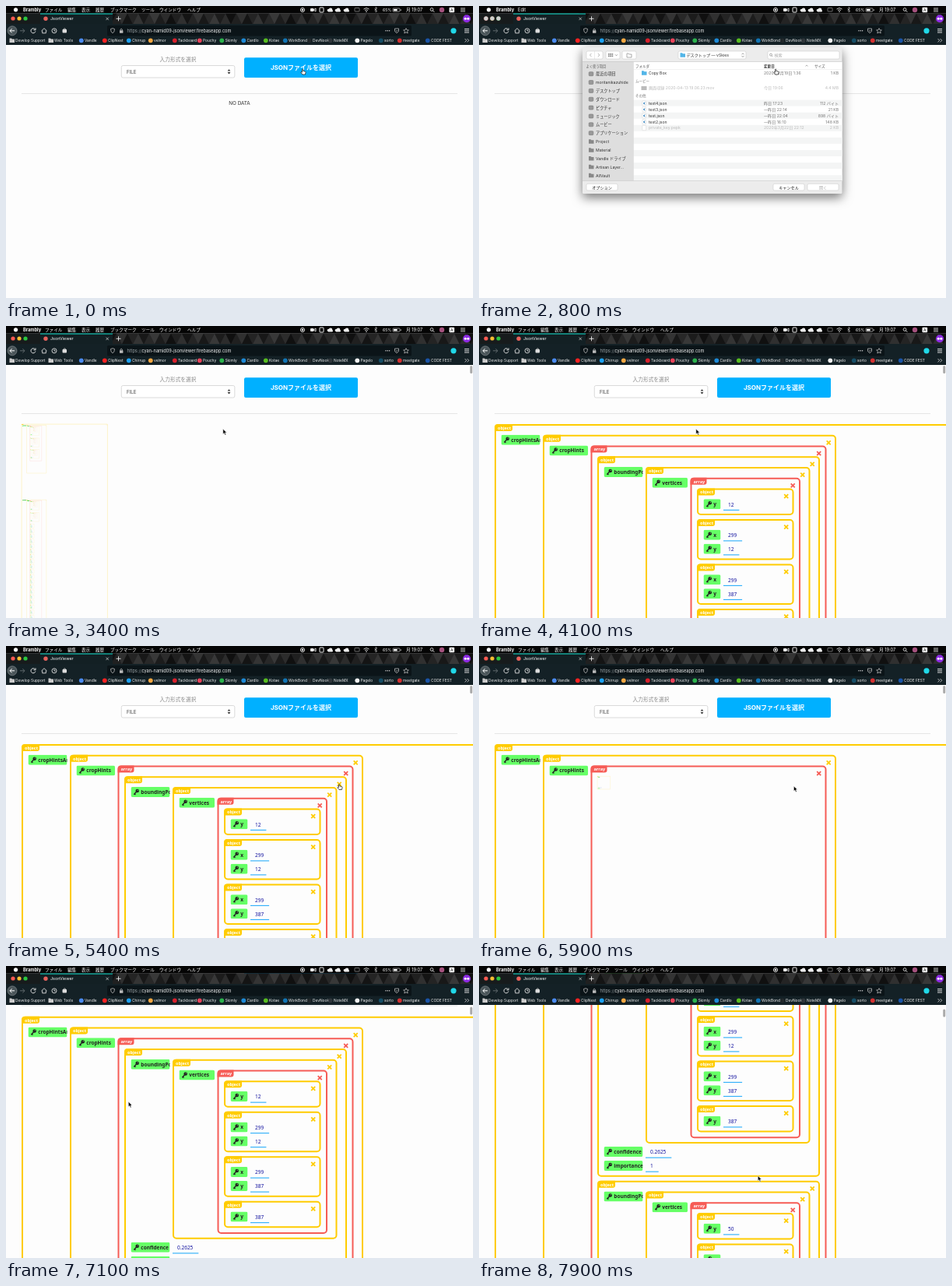
Recreate the animation shown at these times as an HTML page. Size 600 by 375 pixels, loop 8000 ms.

```html
<!DOCTYPE html>
<html>
<head>
<meta charset="utf-8">
<style>
html,body{margin:0;width:100%;height:100%;overflow:hidden;background:#fdfdfd}
svg{display:block}
text{font-family:Inter,"Noto Sans CJK JP",sans-serif;white-space:pre}
#tree text{font-family:"Noto Sans","Noto Sans CJK JP",sans-serif}
#sheet{filter:drop-shadow(0 5px 7px #0008)}
</style>
</head>
<body>
<svg id="stage" width="600" height="375" viewBox="0 0 600 375"></svg>
<script>
const YELLOW = '#fc0', RED = '#f65c56';
const text = (x, y, size, str, fill = '#fff', more = '') =>
  `<text x="${x}" y="${y}" font-size="${size}" fill="${fill}" ${more}>${str}</text>`;
const rect = (x, y, w, h, fill, r = 0, more = '') =>
  `<rect x="${x}" y="${y}" width="${w}" height="${h}" rx="${r}" fill="${fill}" ${more}/>`;
const dot = (x, y, r, fill, more = '') => `<circle cx="${x}" cy="${y}" r="${r}" fill="${fill}" ${more}/>`;
const line = (d, color = '#ddd', width = 0.9) =>
  `<path d="${d}" fill="none" stroke="${color}" stroke-width="${width}"/>`;
const MID = ' text-anchor="middle" ', END = ' text-anchor="end" ', BOLD = ' font-weight="700" ';
const folder = (x, y, fill) => `<path d="M${x} ${y}h2.5l1 1h3v4.5h-6.5z" fill="${fill}"/>`;

// ---- browser window ----
function chrome() {
  let s = rect(0, 0, 600, 9.5, '#050505') + rect(0, 9.5, 600, 14, '#1d1f20');
  for (let i = 0; i < 68; i++) {
    const x = 128 + i * 7, up = i % 2, g = 16 + (i * 37 % 11) * 4;
    s += `<path d="M${x} ${up ? 23.5 : 9.5}h14l-7 ${up ? -14 : 14}z" fill="rgb(${g},${g},${g})"/>`;
  }
  s += rect(0, 9.5, 44, 14, '#171b1c') + rect(44, 9.5, 93, 14, '#132024') + rect(44, 9.5, 93, 1.2, '#0bb8a8');
  s += rect(0, 23, 600, 27, '#142126') + rect(130, 25, 391, 13.5, '#0b1418', 1.5);
  // menu bar
  s += dot(12.5, 4.8, 2.6, '#fff') + text(22, 7, 5.7, 'Brambly', '#fff', BOLD);
  const menu = [[50, 'ファイル'], [79, '編集'], [97, '表示'], [115, '履歴'], [134, 'ブックマーク'], [174, 'ツール'], [197, 'ウインドウ'], [233, 'ヘルプ']];
  s += '<g id="menu">' + menu.map(m => text(m[0], 7, 5.6, m[1])).join('') + '</g>';
  s += '<g id="edit">' + text(50, 7, 5.7, 'Edit') + '</g>';
  s += dot(381, 5, 2.6, 'none', 'stroke="#eee" stroke-width=".9"') + dot(381, 5, 1.3, '#eee');
  s += rect(391, 3, 4.5, 4, '#eee', 1) + line('M395 5l3-2v4z', '#eee') + rect(403, 2, 5, 6, 'none', 0.8, 'stroke="#eee"');
  for (const x of [416, 426, 437]) s += dot(x - 1.5, 5.6, 1.8, '#eee') + dot(x + 1, 4.7, 2.3, '#eee') + rect(x - 2, 5, 6, 2.4, '#eee', 1.2);
  s += rect(448, 2.5, 6, 4.5, 'none', 0.5, 'stroke="#999" stroke-width=".7"');
  s += line('M459.5 4q3.5-3 7 0M461 5.6q2-1.6 4 0') + dot(463, 7.2, 0.8, '#eee') + line('M473.5 3.4l3.2 3-1.6 1.6v-6.6l1.6 1.5-3.2 3', '#ddd', 0.6);
  s += text(484, 7, 5.2, '65%') + rect(497, 3, 9, 4.2, 'none', 0.8, 'stroke="#ddd" stroke-width=".6"') + rect(498, 4, 4.6, 2.3, '#fff') + rect(506.8, 4.3, 0.8, 1.8, '#ddd');
  s += text(514, 7, 5.6, '月 19:07') + dot(547, 4.5, 1.9, 'none', 'stroke="#eee" stroke-width=".8"') + line('M548.4 5.9l1.9 1.9', '#eee', 0.9);
  s += dot(560, 5, 3.2, '#a5527e') + rect(569.5, 1.8, 6.6, 6.4, '#fff', 1) + text(572.8, 6.9, 5, 'A', '#111', MID);
  s += line('M584 3h6M584 5h6M584 7h6', '#eee', 0.8);
  // tabs
  s += dot(9, 16, 2.6, '#ff5b52') + dot(17, 16, 2.6, '#f8bd32') + dot(25, 16, 2.6, '#2cc640');
  s += '<g id="inactive">' + [9, 17, 25].map(x => dot(x, 16, 2.7, '#d0d0d0')).join('') + '</g>';
  s += dot(51, 16.2, 2.7, '#e8625c') + text(57, 18.2, 5.4, 'JsonViewer');
  s += line('M128.5 14.7l3.4 3.4m0-3.4l-3.4 3.4', '#ddd', 0.7) + line('M141.5 16.3h6m-3-3v6', '#eee', 0.9);
  s += dot(592, 16.2, 5, '#8d2be2') + dot(590.2, 16.3, 1.5, '#fff') + dot(593.8, 16.3, 1.5, '#fff');
  // address bar
  s += dot(8, 31.8, 6, '#4a5559', 'stroke="#8b9396" stroke-width=".6"') + line('M11 31.8h-6m2.6-2.6l-2.6 2.6 2.6 2.6', '#fff', 1);
  s += line('M18 31.8h6m-2.6-2.6l2.6 2.6-2.6 2.6', '#5f696c', 1) + line('M37.4 30a3 3 0 1 0 .5 2.5M38 28.4v2.4h-2.4', '#ddd', 1);
  s += line('M45.5 32l3.5-3.3 3.5 3.3M46.7 31.5v3.3h4.6v-3.3') + dot(62, 31.8, 3, 'none', 'stroke="#ddd" stroke-width=".9"') + line('M62 30v2h1.6');
  s += rect(72.5, 30, 5.5, 4.5, '#ddd', 1) + line('M73.3 30.5q2-3.2 4 0');
  s += line('M134.5 29.5l2.5-.8 2.5.8q0 4-2.5 5.4-2.5-1.4-2.5-5.4z', '#bbb', 0.8) + rect(146, 31.3, 4.4, 3.4, '#bbb', 0.5) + line('M147 31.5v-1.4q1.2-1.8 2.4 0v1.4', '#bbb', 0.8);
  s += text(155.5, 33.8, 5.58, '<tspan fill="#9aa3a6">https://</tspan>cyan-namid09-jsonviewer.firebaseapp.com', '#f4f4f4');
  s += [488, 490.3, 492.6].map(x => dot(x, 31.8, 0.7, '#ddd')).join('') + line('M499.5 29h5v3.5l-2.5 2.3-2.5-2.3zM500.8 31.5l1.2 1 1.5-1.5', '#ccc', 0.7);
  s += line('M514 28.6l1 2.2 2.4.2-1.8 1.6.6 2.4-2.2-1.3-2.2 1.3.6-2.4-1.8-1.6 2.4-.2z', '#ccc', 0.7);
  s += dot(575, 31.8, 3.6, '#20d8e8') + line('M589 29.6h6M589 31.8h6M589 34h6', '#eee', 0.9);
  // bookmarks
  const marks = [[12, 'Develop Support'], [62, 'Web Tools'], [101, 'Vandle', '#4b8bf0'], [131, 'ClipNest', '#f22'], [162, 'Chirrup', '#1da1f2'], [190, 'velmor', '#f5a742'],
    [221, 'Tackboard', '#d8202c'], [253, 'Pouchy', '#e8435a'], [281.5, 'Skimly', '#2bb24c'], [309.5, 'Cardlo', '#1d8ad8'], [338, 'Kotae', '#58bd20'], [363, 'WorkBond', '#1275b5'],
    [394, 'DevNook', '#22282b'], [421, 'NoteMX', '#30363b'], [455.5, 'Pagelo', '#f2f2f2'], [486, 'sorto', '#174f68'], [510, 'meetgate', '#d43232'], [546, 'CODE FEST', '#1b55a8']];
  for (const [x, name, color] of marks)
    s += (color ? dot(x - 4.2, 44.3, 2.9, color) : folder(x - 7.5, 41.5, '#ccc')) + text(x, 46.2, 4.85, name, '#f2f2f2');
  return s + line('M589.5 42l2.2 2.2-2.2 2.2m3-4.4l2.2 2.2-2.2 2.2', '#ddd', 0.8);
}

// ---- form ----
const form = text(221, 70.5, 6.7, '入力形式を選択', '#8a8a8a', MID) +
  rect(148.3, 76.5, 145.5, 15.5, '#fff', 2, 'stroke="#ccc" stroke-width=".7"') + text(155, 86.7, 6.2, 'FILE', '#444') +
  '<path d="M284.6 83.6l1.9-2.4 1.9 2.4zM284.6 85l1.9 2.4 1.9-2.4z" fill="#333"/>' +
  rect(306, 66.3, 146, 25.7, '#00b0ff', 2) + text(379, 82.2, 8, 'JSONファイルを選択', '#fff', MID + BOLD) +
  rect(20, 112, 560, 0.7, '#ddd') + '<g id="empty">' + text(300, 126.6, 6.3, 'NO DATA', '#333', MID) + '</g>';

// ---- file dialog ----
function sheet() {
  const button = (x, y, w, h, fill = '#fff', id = '') => rect(x, y, w, h, fill, 1.8, `stroke="#c4c4c4" stroke-width=".5" ${id}`);
  let s = rect(133, 53, 333.5, 188, '#ececec', 1.5) + rect(133, 71.5, 65, 152.5, '#dedede') + rect(198, 71.5, 268.5, 152.5, '#fff');
  for (let y = 120.6; y < 220; y += 16.1) s += rect(198.5, y, 268, 8, '#f4f5f5');
  s += rect(133, 71, 333.5, 0.5, '#bbb') + rect(133, 224, 333.5, 0.5, '#bbb') + rect(198, 71.5, 0.5, 152.5, '#c8c8c8') + rect(198, 81.5, 268.5, 0.4, '#ddd');
  s += [[138, 58, 21, 10], [163, 58, 18, 10], [184, 58, 18, 10], [256, 58, 87, 10], [371, 58, 92, 10]].map(b => button(...b)).join('');
  s += line('M144.5 60.8l-2 2.2 2 2.2M152.8 60.8l2 2.2-2 2.2', '#999', 0.7) + line('M148.5 58v10', '#ccc', 0.4);
  for (const x of [166, 168.3, 170.6]) s += rect(x, 61, 1.6, 1.6, '#777') + rect(x, 63.5, 1.6, 1.6, '#777');
  s += line('M175 62.3l1.5 1.5 1.5-1.5', '#666', 0.6) + line('M190 61h2l1 1h3v4h-6z', '#777', 0.6) + folder(258.5, 60.3, '#52b5e8');
  s += text(266.5, 65, 5.1, 'デスクトップ — vSkies', '#333') + line('M337.5 62.3l1.5-1.6 1.5 1.6m0 1.6l-1.5 1.6-1.5-1.6', '#666', 0.6);
  s += dot(375, 62.6, 1.5, 'none', 'stroke="#777" stroke-width=".6"') + line('M376 63.7l1.4 1.5', '#777', 0.6) + text(379.5, 65, 5.1, '検索', '#aaa');
  s += text(137.5, 79.3, 4.3, 'よく使う項目', '#888', BOLD);
  ['最近の項目', 'moritanikazuhide', 'デスクトップ', 'ダウンロード', 'ピクチャ', 'ミュージック', 'ムービー', 'アプリケーション', 'Project', 'Material', 'Vandle ドライブ', 'Artisan Layer…', 'AllVault']
    .forEach((name, i) => {
      const y = 87.3 + i * 10.85;
      s += (i < 8 ? rect(141.2, y - 2.6, 5.6, 5, '#999', 1, 'stroke="#777" stroke-width=".6"') : folder(141, y - 2.8, '#888')) + text(150, y + 2, 5.15, name, '#333');
    });
  s += text(201, 78.6, 4.5, 'フォルダ', '#555') + text(366, 78.6, 4.6, '変更日', '#333', BOLD) + line('M419.5 77.3l1.5-1.4 1.5 1.4', '#777', 0.6) + text(431, 78.6, 4.6, 'サイズ', '#555');
  s += text(201, 97.8, 4.5, 'ムービー', '#777') + text(201, 116.8, 4.5, 'その他', '#777');
  const rows = [[86.3, 'Copy Box', '2020年2月19日 1:36', '1 KB'], [105.5, '画面収録 2020-04-13 19.06.23.mov', '今日 19:06', '4.4 MB', 1], [124.8, 'text4.json', '昨日 17:23', '112 バイト'],
    [132.6, 'text3.json', '一昨日 22:14', '21 KB'], [140.7, 'test.json', '一昨日 22:04', '898 バイト'], [148.7, 'test2.json', '一昨日 16:10', '148 KB'], [156.5, 'private_key.pepk', '2020年3月22日 22:12', '2 KB', 1]];
  rows.forEach(([y, name, date, size, dim], i) => {
    const picked = i == 3, ink = dim ? '#bbb' : '#333', gray = dim ? '#bbb' : '#777';
    if (picked) s += '<g id="row">' + rect(198.5, 128.6, 268, 7.8, '#0a5bd8', 0, 'id="rowBack"');
    s += i == 0 ? folder(209, 83.3, '#52b5e8') : i == 1 ? rect(208.5, 103, 7, 5, '#bbb') : rect(209.8, y - 3, 4.8, 6.2, '#fff', 0.3, 'stroke="#ccc" stroke-width=".4"');
    if (i > 1 && !dim) s += line(`M213.3 ${y - 1}l-2 1.2 2 1.2`, '#1d75b8', 1);
    s += text(218, y + 1.9, 5.1, name, ink) + text(366, y + 1.9, 5.1, date, gray) + text(462, y + 1.9, 5.1, size, gray, END);
    if (picked) s += '</g>';
  });
  s += button(138, 228.3, 40, 8.6) + text(158, 234.6, 5.1, 'オプション', '#222', MID) + button(378, 228.3, 40, 8.6) + text(398, 234.6, 5.1, 'キャンセル', '#222', MID);
  return s + button(422, 228.3, 40, 8.6, '#fff', 'id="ok"') + text(442, 234.6, 5.1, '開く', '#aaa', MID + ' id="okText"');
}

// ---- JSON tree ----
const hint = (top, bottom, x, confidence) => ({
  boundingPoly: { vertices: [{ y: top }, { x, y: top }, { x, y: bottom }, { y: bottom }] }, confidence, importanceFraction: 1
});
const word = (_, i) => ({ x: 20 + i * 7, y: 40 + i * 9, width: 64, height: 18, text: 'word', locale: 'ja' });
const data = {
  cropHintsAnnotation: { cropHints: [hint(12, 387, 299, 0.2625), hint(50, 349, 299, 0.2625), hint(68, 331, 299, 0.2625)] },
  fullTextAnnotation: { pageItems: [hint(30, 90, 210, 0.97), hint(95, 140, 240, 0.98), ...Array.from({ length: 30 }, word)] }
};
const label = (x, y, w, key) => `<svg x="${x}" y="${y}" width="${w}" height="13">` + rect(0, 0, w, 13, '#6f6', 2) +
  dot(8.2, 5, 2.3, '#222') + dot(8.8, 4.3, 0.6, '#6f6') + line('M7.5 5.8l-3.7 3.9m1-.8l1.2 1.1', '#222', 1.4) + text(12.8, 8.9, 6.5, key, '#222', BOLD) + '</svg>';

function box(value, depth = 0) {
  const list = Array.isArray(value), color = list ? RED : YELLOW;
  let y = 13.75, w = depth ? 124.5 : 1060, body = '';
  for (const [key, v] of Object.entries(value)) {
    let x = 8.5;
    if (!list) {
      const lw = Math.min(50, Math.max(22, 13.5 + 4 * key.length));
      body += label(x, y, lw, key);
      x += lw + 3.5;
    }
    if (typeof v == 'object') {
      const b = box(v, depth + 1);
      body += `<g transform="translate(${x} ${y})">${b.svg}</g>`;
      w = Math.max(w, x + b.w + (list ? 8.5 : 12.5));
      y += b.h + (list ? 5 : 4);
    } else {
      const n = String(v).length;
      body += text(x + 6, y + 9.3, 6.5, v, '#1414a0') + rect(x, y + 13.6, 13 + 3.7 * (n > 4 ? n - 0.5 : n), 1.1, '#2aaefa');
      y += 18;
    }
  }
  const h = y + 2.75;
  const svg = `<g class="box" data-depth="${depth}" data-h="${h}">` + rect(1, 1, w - 2, h - 2, 'none', 4, `stroke="${color}" stroke-width="2"`) +
    `<path d="M0 9v-5q0-4 4-4h${list ? 17 : 19}v6q0 3-3 3z" fill="${color}"/>` + text(4, 6.8, 5.5, list ? 'array' : 'object', '#fff', BOLD) +
    line(`M${w - 12.3} 7.7l5 5m0-5l-5 5`, color, 1.8) + body + '</g>';
  return { w, h, svg };
}

const pointer = '<path id="arrow" d="M0 0v6.4l1.5-1.3 1.1 2.5 1.2-.5-1.1-2.5h2z" fill="#000" stroke="#fff" stroke-width=".5"/>' +
  '<path id="hand" d="M-1-2.5q.8-1 1.4 0v2l2.8.7q.6.3.3 1.4l-.6 2.4h-3.4l-2.3-2.8q.3-1 1.8 0z" fill="#fff" stroke="#111" stroke-width=".7"/>';

stage.innerHTML = `<g id="page">${form}<g id="tree" transform="translate(20 126)">${box(data).svg}</g></g>` +
  rect(596.2, 51, 3, 10, '#aaa', 1.5, 'id="thumb"') + `<g id="sheet">${sheet()}</g>` + chrome() + `<g id="pointer">${pointer}</g>`;

const $ = id => document.getElementById(id);
const boxes = [...document.querySelectorAll('.box')];
const folded = boxes.find(b => b.dataset.depth == 3);
const slot = folded.parentNode;
const inFold = new Set(boxes.filter(b => folded.contains(b)));
const below = [...slot.parentNode.children].filter(e => e.tagName == 'g' && e != slot)
  .map(el => ({ el, at: el.getAttribute('transform') }));
slot.insertAdjacentHTML('beforeend', '<g id="chip">' + rect(0, 0, 25, 15, YELLOW, 4) + text(4, 9.5, 5.5, 'object', '#fff', BOLD) + '</g>');

// ---- motion ----
const clamp = u => Math.min(1, Math.max(0, u));
const smooth = u => u * u * (3 - 2 * u);
// CSS "ease" timing
function ease(u) {
  if (u <= 0 || u >= 1) return clamp(u);
  let lo = 0, hi = 1, p;
  for (let i = 0; i < 20; i++) {
    p = (lo + hi) / 2;
    if (0.75 * p * (1 - p) + p ** 3 < u) lo = p; else hi = p;
  }
  return 0.3 * p * (1 - p) ** 2 + 3 * p * p * (1 - p) + p ** 3;
}
function track(t, keys, curve = u => u) {
  const i = keys.findIndex(k => k[0] > t);
  if (i < 0) return keys[keys.length - 1].slice(1);
  if (!i) return keys[0].slice(1);
  const a = keys[i - 1], b = keys[i], u = curve((t - a[0]) / (b[0] - a[0]));
  return a.slice(1).map((v, j) => v + (b[j + 1] - v) * u);
}
const show = (id, on) => $(id).setAttribute('display', on ? 'inline' : 'none');
const move = (el, x, y) => el.setAttribute('transform', `translate(${x} ${y})`);

const path = [[0, 381.5, 84], [900, 381.5, 84], [1500, 278.8, 132.3], [4600, 278.8, 132.3], [5250, 428.5, 180.5], [5800, 428.5, 180.5],
  [6350, 157.3, 174.3], [7350, 157.3, 174.3], [7800, 358.3, 269.5]];
const scrolls = [[6850, 0], [7100, 61], [7350, 130], [7550, 168], [7750, 184]];
const starts = [3348, 3213, 3177, 3150];

function draw(t) {
  const open = clamp((t - 350) / 250) * (1 - clamp((t - 2000) / 250));
  show('sheet', open > 0);
  move($('sheet'), 0, (smooth(open) - 1) * 195);
  show('edit', open > 0);
  show('inactive', open > 0);
  show('menu', open == 0);
  const picked = t >= 1500;
  show('rowBack', picked);
  $('row').querySelectorAll('text').forEach((e, i) => e.setAttribute('fill', picked ? '#fff' : i ? '#777' : '#333'));
  $('ok').setAttribute('fill', picked ? '#1a72ee' : '#fff');
  $('okText').setAttribute('fill', picked ? '#fff' : '#aaa');

  show('empty', t < 3150);
  show('tree', t > starts[0]);
  const fold = t < 6250 ? 1 - ease((t - 5550) / 500) : ease((t - 6502) / 500);
  for (const b of boxes) {
    const grow = ease((t - starts[Math.min(3, b.dataset.depth)]) / 500);
    b.setAttribute('transform', `scale(${grow * (inFold.has(b) ? fold : 1)})`);
  }
  const closed = fold == 0;
  show('chip', closed);
  for (const { el, at } of below)
    el.setAttribute('transform', at + (closed ? ` translate(0 ${15 - folded.dataset.h})` : ''));

  const [scroll] = track(t, scrolls);
  move($('page'), 0, -scroll);
  show('thumb', t >= 3350);
  move($('thumb'), 0, scroll * 0.024);

  move($('pointer'), ...track(t, path, smooth));
  const hand = t < 950 || (t > 5200 && t < 5850);
  show('hand', hand);
  show('arrow', !hand);
}
function loop() {
  draw(performance.now() % 8000);
  requestAnimationFrame(loop);
}
loop();
</script>
</body>
</html>
```
